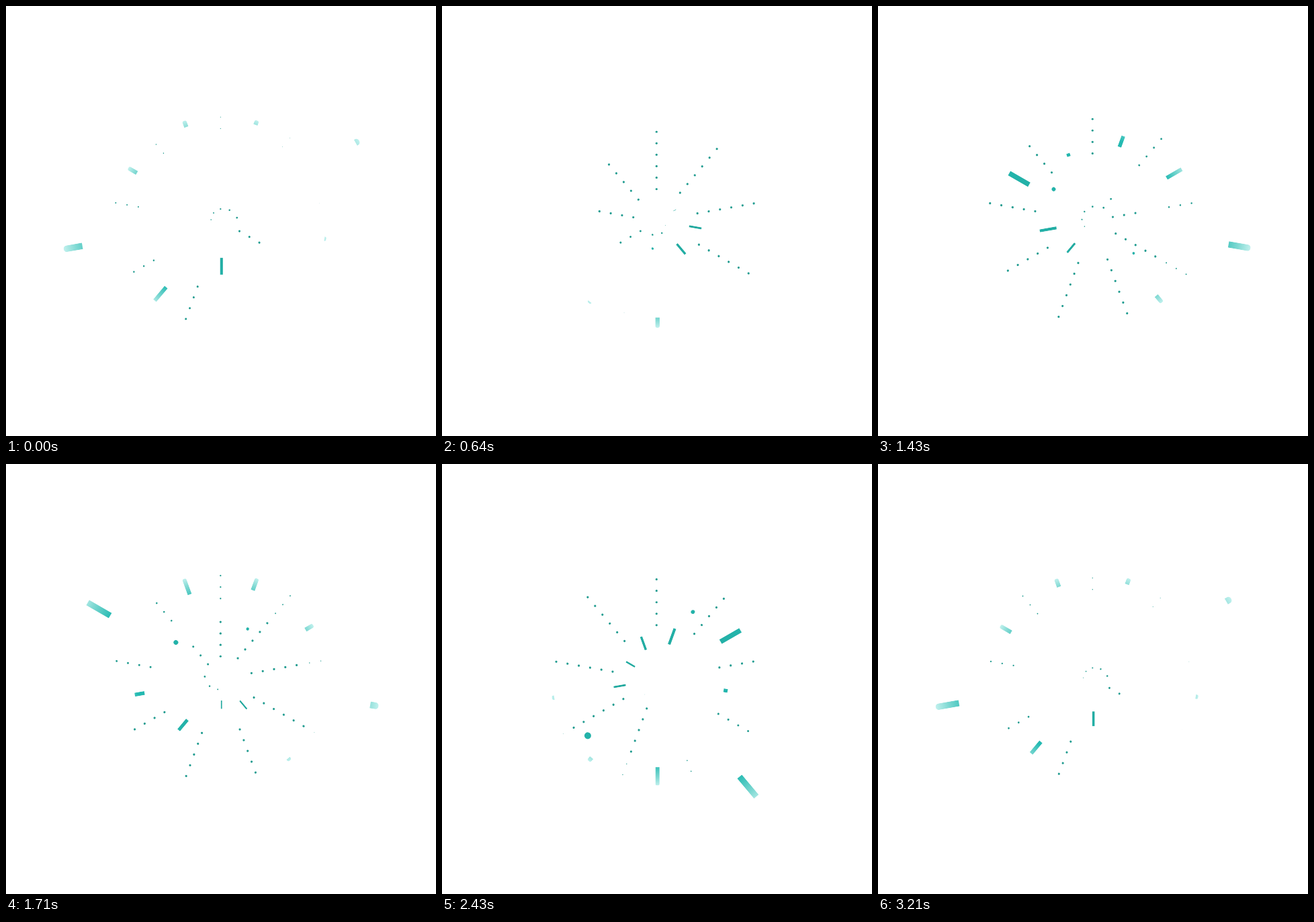
An HTML page with a canvas that plays this animation: 640x640 px, repeating every 3.28 s.

```html
<!DOCTYPE html>
<html lang="en">
<head>
<meta charset="utf-8">
<title>Burst</title>
<style>
html, body { margin: 0; width: 100%; height: 100%; overflow: hidden; background: #fff; }
canvas { display: block; width: 640px; height: 640px; }
</style>
</head>
<body>
<canvas id="stage" width="640" height="640"></canvas>
<script>
const ctx = document.getElementById('stage').getContext('2d');
const LOOP = 3280, WAVE = 1300;

// Easing helpers: a soft rise to 1, an S-curve around 0, and a clamped ease.
const surge = (t, scale, power) => 1 - Math.exp(-((Math.max(0, t) / scale) ** power));
const sigmoid = x => 1 / (1 + Math.exp(-x));
const smooth = x => { x = Math.min(1, Math.max(0, x)); return x * x * (3 - 2 * x); };

// Time since an anchor, wrapped so that it begins at `birth`.
const since = (t, anchor, birth) =>
  ((t - anchor - birth) % LOOP + LOOP) % LOOP + birth;

// Runs `paint` with up pointing outward along the given angle.
function along(angle, paint) {
  ctx.save();
  ctx.translate(320, 320);
  ctx.rotate(angle * Math.PI / 180);
  ctx.translate(-0.7, 0);
  paint();
  ctx.restore();
}

function disc(r, size) {
  ctx.beginPath();
  ctx.arc(0, -r, size / 2, 0, 2 * Math.PI);
  ctx.fill();
}

// Dotted rays every 40 degrees: the tail drifts outward, the head runs ahead.
const dotStarts = [0, -105, -210, -365, 580, 505, 325, 195, 85];
const DOT_BIRTH = -320, DOT_LIFE = 2740, GAP = 17.05;

const dotTail = t => 13 + 13 * Math.log(1 + Math.exp((t - 150) / 190))
  - 3.5e-5 * Math.max(0, t - 1850) ** 2;
const dotHead = t => 14 + 148 * surge(t + 15, 511, 2);

function drawDots(angle, t) {
  const age = (t - DOT_BIRTH) / DOT_LIFE;
  if (age > 1) return;
  const size = 3.2 * Math.min(1, (age / 0.27) ** 0.4) * smooth((1 - age) / 0.4);
  const tail = dotTail(t), head = Math.max(tail, dotHead(t));
  ctx.fillStyle = '#219c90';
  along(angle, () => {
    for (let r = tail; r <= head; r += GAP) disc(r, size);
  });
}

// Bars between the dotted rays: the span between two trims that cross midway.
const barStarts = [859, 757, 653, 475, 1707, 1296, 1152, 1058, 948];
const longBars = [[100, 300], [60, 140, 260]];
const BAR_BIRTH = -230, BAR_END = 1360, SHORT = 159, LONG = 238;

const easedTrim = t => Math.min(1, 0.18 + 0.825 * surge(t - BAR_BIRTH, 750, 1.76));
const lateTrim = t => Math.min(1,
  Math.max(0.18, 0.2 + 0.0005 * t) + 0.44 * sigmoid((t - 490) / 55));

function barGradient(len) {
  const g = ctx.createLinearGradient(0, 0, 0, -len);
  g.addColorStop(0, '#22a297');
  g.addColorStop(0.79, '#24bab2');
  g.addColorStop(0.92, '#80d9d3');
  g.addColorStop(1, '#c2f1ee');
  return g;
}
const gradients = { [SHORT]: barGradient(SHORT), [LONG]: barGradient(LONG) };

function drawBar(angle, t, len) {
  if (t > BAR_END) return;
  const a = easedTrim(t) * len, b = lateTrim(t) * len;
  const w = 6.9 * surge(t - BAR_BIRTH, 496, 1.34) * len / SHORT;
  along(angle, () => {
    // Rounded only where the track itself ends.
    ctx.beginPath();
    ctx.moveTo(-w / 2, 0);
    ctx.arc(0, w / 2 - len, w / 2, Math.PI, 2 * Math.PI);
    ctx.lineTo(w / 2, 0);
    ctx.clip();
    ctx.fillStyle = gradients[len];
    ctx.fillRect(-w / 2, -Math.max(a, b), w, Math.abs(a - b));
  });
}

// Loose dots, one after another, each larger than the last: angle and lead.
const sparks = [[190, 0], [129, 4], [309.5, 2], [28.5, 0], [231, 20]];

function drawSpark(i, t) {
  const [angle, lead] = sparks[i];
  const age = (t - 240 - 425 * i) / (930 + 85 * i);
  if (age < 0 || age > 1) return;
  ctx.fillStyle = '#23b2a9';
  along(angle, () =>
    disc(16 + 0.04 * t + lead, (3.5 + 1.8 * i) * Math.sin(Math.PI * age)));
}

function draw(t) {
  ctx.clearRect(0, 0, 640, 640);
  for (let wave = 0; wave < 2; wave++) {
    dotStarts.forEach((start, i) => {
      const angle = 40 * i;
      if (wave && angle === 160) return; // this ray fires once per loop
      drawDots(angle, since(t, start + wave * WAVE, DOT_BIRTH));
    });
    barStarts.forEach((start, i) => {
      const angle = 20 + 40 * i, long = longBars[wave].includes(angle);
      const anchor = start + wave * WAVE - (long ? 20 : 0);
      drawBar(angle, since(t, anchor, BAR_BIRTH), long ? LONG : SHORT);
    });
  }
  sparks.forEach((_, i) => drawSpark(i, t));
}

// 14 steps per second, rounded to a 10 ms grid.
const hold = t => 10 * Math.round(Math.floor((t + 4.9) * 0.014) * 50 / 7);

const start = performance.now();
let shown = -1;
function tick() {
  const t = hold((performance.now() - start) % LOOP);
  if (t !== shown) draw(shown = t);
  requestAnimationFrame(tick);
}
tick();
</script>
</body>
</html>
```
